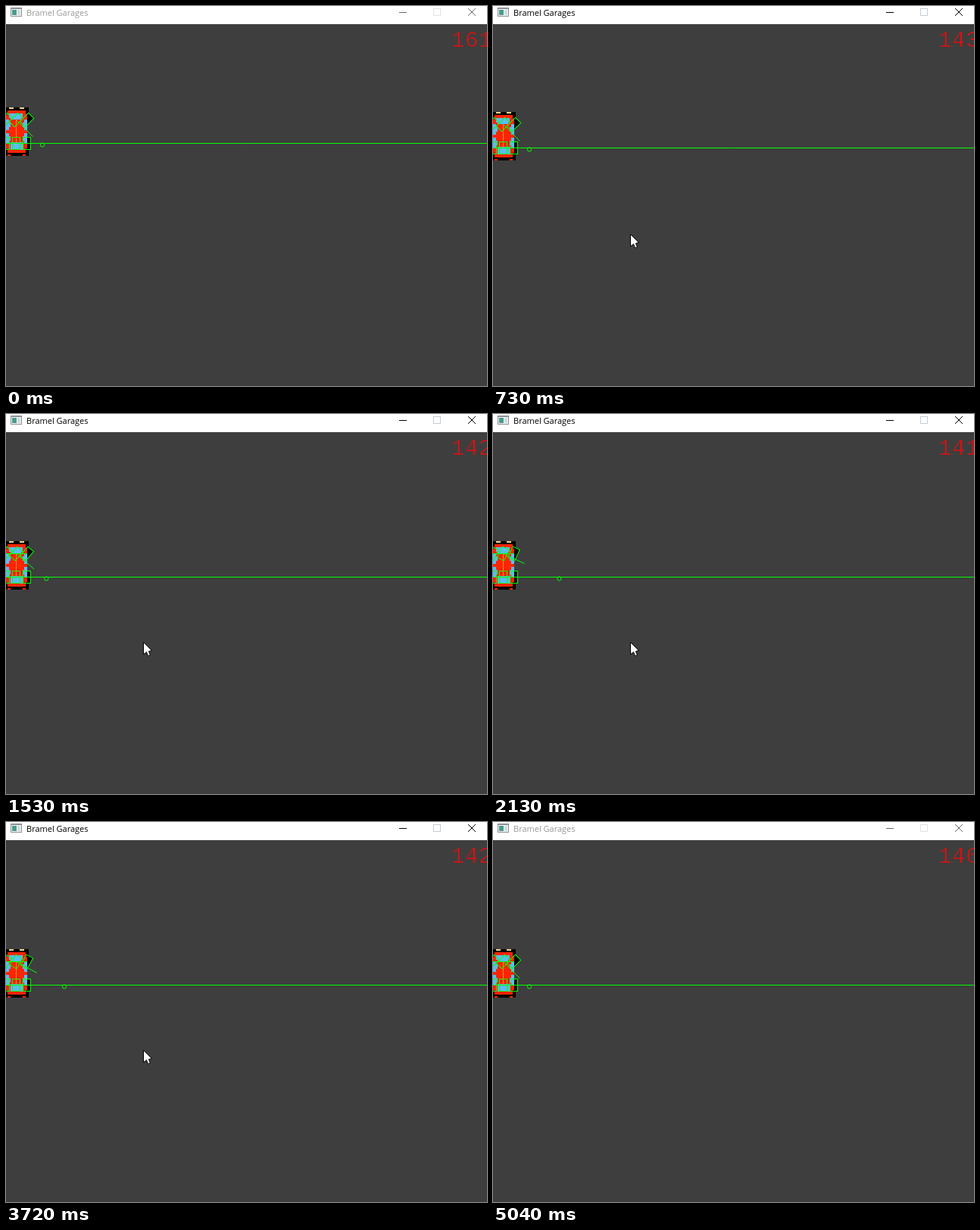
Recreate the animation shown at these times as an HTML page with a canvas. Size 635x502 px, loop 5070 ms.

```html
<!DOCTYPE html>
<html lang="en">
<head>
<meta charset="utf-8">
<title>Bramel Garages</title>
<style>
html, body { margin: 0; width: 100%; height: 100%; overflow: hidden; background: #3e3e3e }
canvas { display: block }
</style>
</head>
<body>
<canvas width="635" height="502"></canvas>
<script>
const c = document.querySelector('canvas').getContext('2d');
const LOOP = 5070, BACK = '#3e3e3e', GREEN = '#00ff00', RED = '#ff2400', BLUE = '#5cbcf6';
const FRONT = 16.5, REAR = 47.5, MIDDLE = 13.5;

const clamp = (v, lo, hi) => Math.max(lo, Math.min(hi, v));
const progress = (t, start, end) => clamp((t - start) / (end - start), 0, 1);
const bezier = (u, a, b, d) => (1 - u) * (1 - u) * a + 2 * u * (1 - u) * b + u * u * d;
const random = seed => Math.abs(Math.sin(seed * 127.1) * 43758.5) % 1;

const carY = t => Math.round(134 + 34 * progress(t, 658, 1069));
const steering = t => Math.min(45, 5.7 + .0265 * Math.abs(t - 2860)) * Math.PI / 180;

function frameRate(t) {
  const settle = 162 - 19 * progress(t, 0, 730);
  const drift = 6 * progress(t, 2860, 5040) - 3 * progress(t, 730, 2860);
  return Math.round(settle + drift + 2 * random(Math.floor(t / 33.3)) - 1);
}

function box(color, x, y, w, h) {
  c.fillStyle = color;
  c.fillRect(x, y, w, h);
}

function line(color, x1, y1, x2, y2) {
  c.strokeStyle = color;
  c.beginPath();
  c.moveTo(x1, y1);
  c.lineTo(x2, y2);
  c.stroke();
}

function titleBar(active) {
  box('#fff', 0, 0, 635, 24);
  box('#8a8f92', 6, 2, 15, 12);
  box('#f4f6f6', 7, 4, 13, 9);
  box('#4a9c8c', 8, 5, 6, 7);
  box('#cfdedb', 15, 5, 4, 7);
  c.fillStyle = active ? '#000' : '#999';
  c.font = '11px "Open Sans", "Noto Sans", sans-serif';
  c.fillText('Bramel Garages', 27, 13);
  const ink = active ? '#000' : '#666';
  line(ink, 519, 8.5, 529, 8.5);
  c.strokeStyle = active ? '#c4ccd2' : '#e0e4e7';
  c.strokeRect(564.5, 3.5, 9, 9);
  line(ink, 610, 3, 620, 13);
  line(ink, 620, 3, 610, 13);
}

function counter(t) {
  c.font = '29px "Liberation Mono", monospace';
  c.fillStyle = '#e01010';
  c.strokeStyle = BACK;
  c.lineWidth = .6;
  [...String(frameRate(t))].forEach((digit, i) => {
    c.fillText(digit, 588 + i * 18, 54);
    c.strokeText(digit, 588 + i * 18, 54);
  });
  c.lineWidth = 1;
}

function wheel(x, y, angle, draw) {
  c.save();
  c.translate(x, y);
  c.rotate(angle);
  draw();
  c.restore();
}

function sprite(angle) {
  const tyre = () => box('#000', -5, -8, 10, 16);
  wheel(27.5, FRONT, angle, tyre);
  wheel(27.5, REAR, 0, tyre);
  box('#000', 0, 0, 30, 8);
  box('#000', 0, 56, 30, 8);
  box(RED, 2, 4, 24, 56);
  box(RED, 0, 10, 28, 44);
  box(BLUE, 4, 8, 18, 6);
  box(BLUE, 6, 14, 14, 2);
  box(BLUE, 6, 46, 16, 10);
  for (const y of [16, 34]) {
    for (const [w, inset] of [[4, 0], [6, 4]]) {
      box(BLUE, 0, y + inset, w, 14 - 2 * inset);
      box(BLUE, 28 - w, y + inset, w, 14 - 2 * inset);
    }
  }
  for (const x of [4, 18]) box('#f2d28c', x, 0, 6, 2);
  for (const x of [2, 22]) box(RED, x, 62, 4, 2);
  line('#ff8a20', MIDDLE, FRONT, MIDDLE, REAR);
}

// Wheel outlines, axle lines and the point the car turns around.
function guides(angle, parked) {
  const outline = () => c.strokeRect(-5, -8, 10, 16);
  c.strokeStyle = GREEN;
  for (const x of [-.5, MIDDLE, 27.5]) {
    wheel(x, FRONT, angle, outline);
    wheel(x, REAR, 0, outline);
  }
  if (parked) line(GREEN, 0, FRONT, 28, FRONT);
  line(GREEN, 0, REAR, 635, REAR);
  line(GREEN, MIDDLE, FRONT, MIDDLE + 31 * Math.cos(angle), FRONT + 31 * Math.sin(angle));
  c.beginPath();
  c.arc(MIDDLE + 34.5 / Math.tan(angle), REAR + 2, 2.6, 0, 7);
  c.stroke();
}

function cursor(t) {
  const enter = 1 - (1 - progress(t, 70, 520)) ** 1.5;
  const leave = progress(t, 3960, 4440);
  const x = leave ? bezier(leave, 182, 390, 580) : bezier(enter, 490, 265, 182);
  const y = leave ? bezier(leave, 301, 320, 504) : bezier(enter, 504, 400, 301);
  c.save();
  c.translate(Math.round(x) - .5, Math.round(y) + .5);
  c.fillStyle = '#fff';
  c.strokeStyle = '#000';
  const arrow = new Path2D('M0 0V16L4 13L6 18L9 17L7 12L11 11Z');
  c.fill(arrow);
  c.stroke(arrow);
  c.restore();
}

function frame(now) {
  const t = now % LOOP, angle = steering(t);
  box(BACK, 0, 0, 635, 502);
  titleBar(t > 480 && t < 4950);
  counter(t);
  c.save();
  c.translate(0, carY(t));
  sprite(angle);
  guides(angle, t > 1069);
  c.restore();
  cursor(t);
  requestAnimationFrame(frame);
}
requestAnimationFrame(frame);
</script>
</body>
</html>
```
